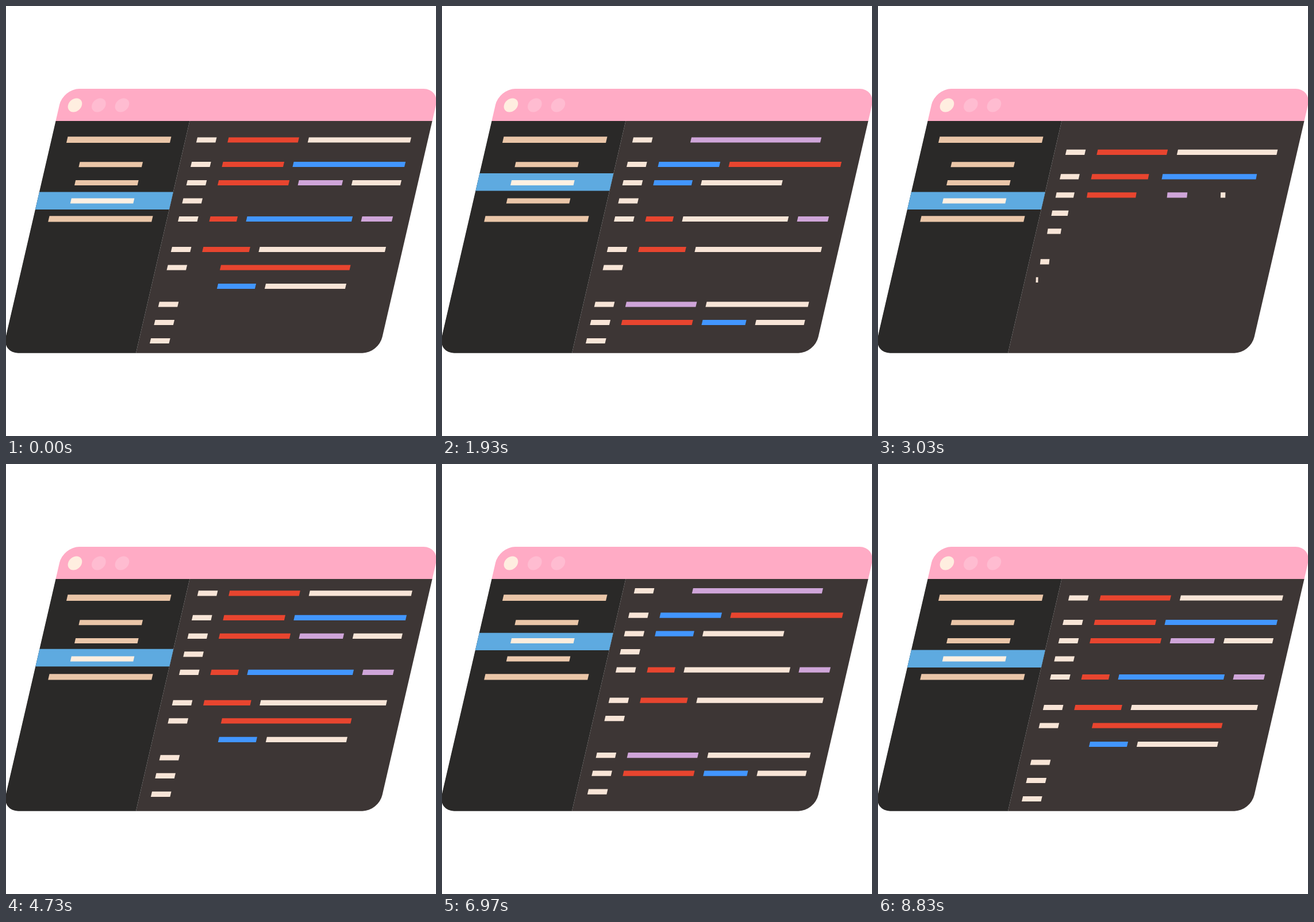
Recreate the animation shown at these times as an HTML page with a canvas. Size 748 by 748 pixels, loop 8860 ms.

```html
<!DOCTYPE html>
<html lang="en">
<head>
<meta charset="utf-8">
<title>Code editor</title>
<style>
  html, body { margin: 0; width: 100%; height: 100%; overflow: hidden; background: #fff; }
  canvas { display: block; width: 748px; height: 748px; }
</style>
</head>
<body>
<canvas id="stage" width="748" height="748"></canvas>
<script>
const ctx = document.getElementById('stage').getContext('2d');

const LOOP = 8860;
const HALF = LOOP / 4;          // one page turn plus its rest
const SKEW = 0.2314;
const PAGE = 420;               // scroll distance between pages
const TOP = 200;                // lower edge of the title bar

const COLOR = {
  r: '#e8452f', b: '#4296ff', p: '#cfa5d9', w: '#f8e5d7'
};
const TAN = [234, 198, 168];
const LIT = [255, 240, 226];

const ROWS = [233, 275.5, 307.5, 339, 370.5, 423.5, 455, 487.5, 519, 550.5, 582.5];
const LABEL_ROWS = [0, 1, 2, 3, 4, 5, 6, 8, 9, 10];

// Bars: row, colour, x, width. They grow in this order.
const PAGES = [
  {
    labelStart: 503, barStart: 505, highlight: 338.7,
    bars: [
      [0, 'r', 394, 122.5], [0, 'w', 533.5, 178],
      [1, 'r', 394, 106.5], [1, 'b', 517, 194.5],
      [2, 'r', 394, 123], [2, 'p', 533.5, 76.5], [2, 'w', 626.8, 85],
      [4, 'r', 394, 47.5], [4, 'b', 458, 183.5], [4, 'p', 658, 53.5],
      [5, 'r', 394, 81.5], [5, 'w', 492.2, 219.5],
      [6, 'r', 432, 225.5],
      [7, 'b', 434.5, 66], [7, 'w', 517.5, 140]
    ]
  },
  {
    labelStart: 629, barStart: 679, highlight: 306.3,
    bars: [
      [0, 'p', 440.6, 226],
      [1, 'b', 394, 106.5], [1, 'r', 517, 194.5],
      [2, 'b', 393.3, 66.5], [2, 'w', 476, 140.5],
      [4, 'r', 394, 47.5], [4, 'w', 458, 183.5], [4, 'p', 658, 53.5],
      [5, 'r', 394, 81.5], [5, 'w', 492.2, 219.5],
      [8, 'p', 393.7, 122.5], [8, 'w', 533.3, 178],
      [9, 'r', 393.7, 123], [9, 'b', 533.6, 76], [9, 'w', 626.7, 85]
    ]
  }
];

const clamp = x => Math.min(1, Math.max(0, x));
const outQuart = x => 1 - (1 - x) ** 4;
const inOutQuart = x => x < 0.5 ? 8 * x ** 4 : 1 - 8 * (1 - x) ** 4;
const grow = (t, start, i) => outQuart(clamp((t - start - i * 50) / 435));

function mix(a, b, p) {
  return `rgb(${a.map((v, i) => Math.round(v + (b[i] - v) * p))})`;
}

function rect(x, y, w, h, fill) {
  ctx.fillStyle = fill;
  ctx.fillRect(x, y, w, h);
}

// A slanted bar whose slant shrinks along with its width.
function bar(x, yMid, w, color, g) {
  if (g <= 0) return;
  const h = 9.2;
  const lean = SKEW * h * (1 - g);
  const y = yMid - h / 2;
  const left = x;
  ctx.fillStyle = color;
  ctx.beginPath();
  ctx.moveTo(left - lean, y);
  ctx.lineTo(left - lean + w * g, y);
  ctx.lineTo(left + w * g, y + h);
  ctx.lineTo(left, y + h);
  ctx.fill();
}

function drawPage(page, dy, t) {
  LABEL_ROWS.forEach((row, i) =>
    bar(339.6, ROWS[row] + dy, 33.5, COLOR.w, grow(t, page.labelStart, i)));
  page.bars.forEach(([row, c, x, w], i) =>
    bar(x, ROWS[row] + dy, w, COLOR[c], grow(t, page.barStart, i)));
}

function drawSidebar(from, to, p) {
  rect(86, TOP, 233.5, 404, '#2a2928');
  const y = from.highlight + (to.highlight - from.highlight) * p;
  rect(86, y - 15.2, 233.5, 30.4, '#5eaae0');
  const upper = to === PAGES[1] ? p : 1 - p;
  const plain = mix(TAN, LIT, 0);
  rect(113.8, 227.2, 180, 10.8, plain);
  rect(145, 271.2, 109.5, 9, plain);
  rect(145, 303, 109.5, 9, mix(TAN, LIT, upper));
  rect(145, 334.5, 109.5, 9, mix(TAN, LIT, 1 - upper));
  rect(113.8, 365.2, 180, 10.4, plain);
}

function drawHeader() {
  rect(80, 140, 670, TOP - 140, '#ffabc5');
  [113.6, 155, 195.6].forEach((x, i) => {
    ctx.fillStyle = i ? '#ffbcd1' : '#ffeee0';
    ctx.beginPath();
    ctx.arc(x, 172.5, 12, 0, Math.PI * 2);
    ctx.fill();
  });
}

function draw(time) {
  const t = time % HALF;
  const turn = Math.floor(time / HALF) % 2;
  const from = PAGES[turn];
  const to = PAGES[1 - turn];
  const scroll = inOutQuart(clamp((t - 70) / 1040));
  const slide = inOutQuart(clamp((t - 70) / 810));

  ctx.setTransform(1, 0, 0, 1, 0, 0);
  rect(0, 0, 748, 748, '#fff');

  ctx.save();
  ctx.setTransform(1, 0, -SKEW, 1, SKEW * TOP, 0);
  ctx.beginPath();
  ctx.roundRect(86.5, 144, 655, 459.7, 28);
  ctx.clip();
  rect(319.5, TOP, 430, 404, '#3d3635');
  drawPage(from, -PAGE * scroll, Infinity);
  drawPage(to, PAGE * (1 - scroll), t);
  drawSidebar(from, to, slide);
  drawHeader();
  ctx.restore();
}

const begin = performance.now();
function tick() {
  draw((performance.now() - begin) % LOOP);
  requestAnimationFrame(tick);
}
tick();
</script>
</body>
</html>
```
